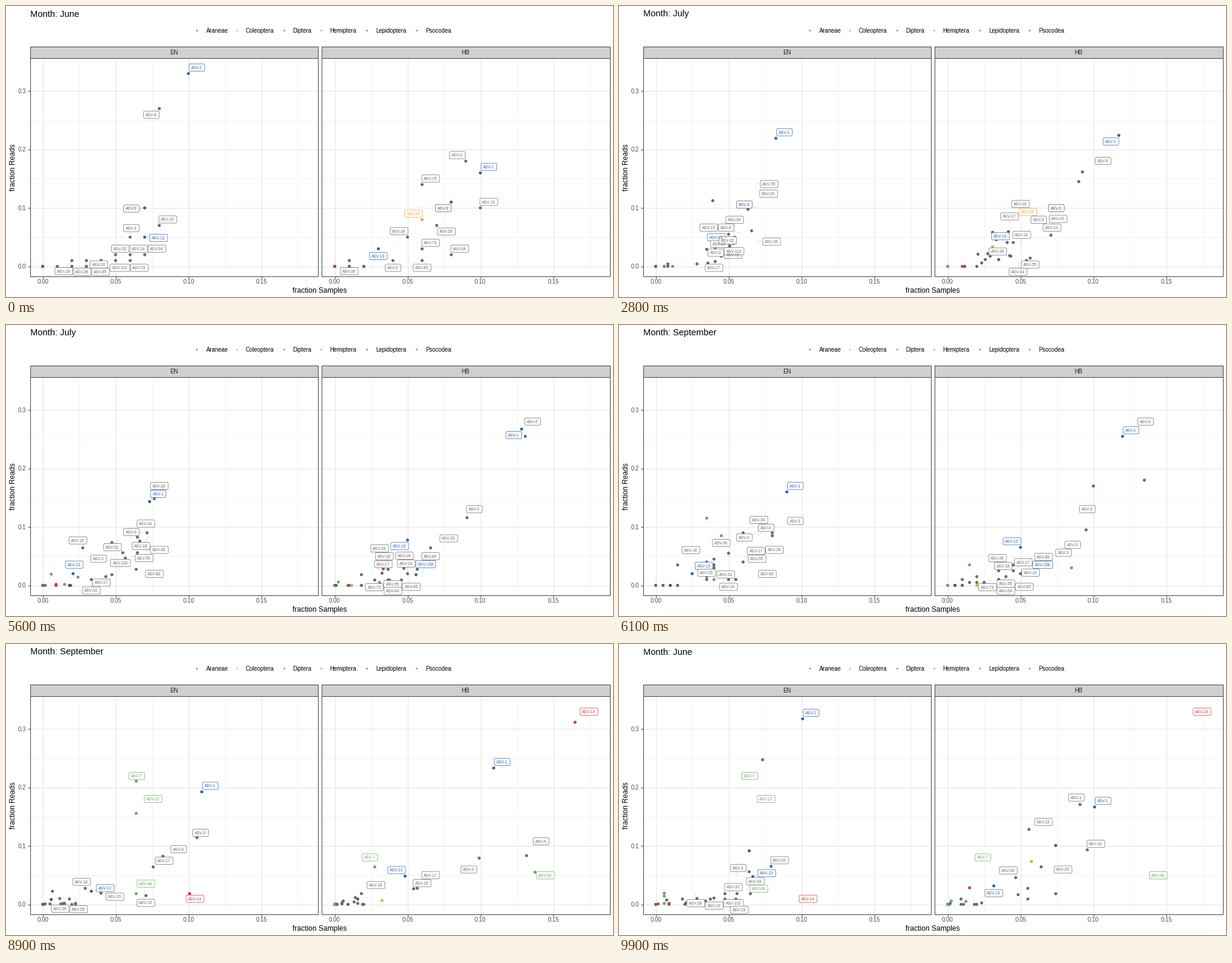
These frames come from a looping animation (1000x480 px, 10 s). A matplotlib script:

```python
from itertools import zip_longest

import matplotlib.pyplot as plt
import numpy as np
from matplotlib.animation import FuncAnimation
from matplotlib.patches import FancyBboxPatch, Rectangle

W, H, DPI = 1000, 480, 100
FRAMES, STEP = 100, 100
FONT = "Liberation Sans"
DARK = "#444444"
MONTHS = ["June", "July", "September"]
MOVES = [(21, 33), (55, 67), (88, 100)]  # first and last frame of each change
PANELS = {"EN": (39, 60), "HB": (519.6, 541)}  # left edge, x of zero
PANEL_W, TOP, STRIP, BOTTOM = 474.4, 66, 85, 445
X_UNIT, Y_UNIT, Y_ZERO = 24, 9.64, 429  # pixels per 0.01
LABEL_H = 12

# Legend order is also the drawing order.
ORDERS = [
    ("Araneae", "#2f65af", 314, 329),
    ("Coleoptera", "#efa62f", 380, 394),
    ("Diptera", "#6a6a6a", 458, 472),
    ("Hemiptera", "#6aa963", 519, 533),
    ("Lepidoptera", "#6b4778", 594, 609),
    ("Psocodea", "#cb3a3d", 676, 691),
]
SPECIAL = {1: 0, 13: 0, 158: 0, 25: 1, 7: 3, 12: 3, 48: 3, 9: 4, 14: 5}

# Where a label starts out relative to its point
SIDES = {
    "ne": (14, -10), "nw": (-14, -10), "se": (16, 10), "sw": (-13, 10),
    "n": (2, -15), "s": (0, 12), "e": (23, 1), "w": (-22, 1),
}


def row(reads, first, last, asvs, side="ne"):
    """Spread taxa with equal reads evenly along the samples axis."""
    xs = np.linspace(first, last, len(asvs)).round()
    return {asv: (x, reads, side) for asv, x in zip(asvs, xs)}


# ASV: percent of samples, percent of reads, label side
JUNE = {
    "EN": {
        1: (10, 33, "ne"), 8: (8, 27, "sw"), 9: (7, 10, "w"),
        10: (8, 7, "ne"), 3: (6, 5, "n"), 13: (7, 5, "e"),
        **row(2, 5, 7, [32, 34, 64]),
        **row(1, 2, 6, [28, 36, 20, 85, 110, 15], "s"),
        **row(0, 1, 3, [80, 18, 73, 17]),
    },
    "HB": {
        3: (9, 18, "nw"), 1: (10, 16, "ne"), 15: (6, 14, "ne"),
        10: (10, 10, "ne"), 9: (8, 11, "sw"), 25: (6, 8, "nw"),
        29: (7, 7, "se"), 28: (5, 5, "nw"), 73: (6, 3, "ne"),
        13: (3, 3, "s"), 64: (8, 2, "ne"),
        **row(1, 1, 6, [36, 6, 85], "s"),
        **row(0, 1, 2, [8, 20, 80, 17, 110]),
    },
}
JULY = {
    "EN": {
        20: (8, 16, "ne"), 1: (7, 14, "ne"), 34: (7, 9, "n"), 6: (7, 9, "w"),
        15: (3, 7, "nw"), 32: (5, 8, "sw"), 18: (7, 8, "sw"), 36: (7, 6, "e"),
        55: (6, 5, "e"), 3: (5, 5, "w"), 80: (7, 3, "se"),
        **row(2, 2, 5, [13, 110], "n"),
        **row(1, 3, 4, [10, 17], "s"),
        **row(0, 1, 2, [8, 29, 48, 25, 9, 12, 64, 85]),
    },
    "HB": {
        6: (13, 27, "ne"), 1: (13, 27, "sw"), 3: (9, 12, "ne"),
        20: (7, 7, "ne"), 13: (5, 8, "sw"), 36: (4, 3, "nw"),
        18: (5, 3, "n"), 80: (6, 3, "ne"),
        **row(2, 2, 6, [29, 17, 10, 158], "n"),
        **row(1, 3, 5, [73, 55, 64, 85], "s"),
        **row(0, 1, 2, [15, 25, 8, 14, 48, 110]),
    },
}
SEPTEMBER = {
    "EN": {
        7: (7, 23, "sw"), 12: (7, 17, "ne"), 1: (11, 18, "ne"),
        3: (11, 12, "ne"), 6: (9, 9, "ne"), 17: (8, 7, "ne"),
        48: (7, 2, "n"), 14: (11, 2, "sw"), 18: (3, 3, "nw"), 10: (7, 1, "s"),
        **row(2, 3, 4, [13, 20], "e"),
        **row(1, 1, 2, [36, 55], "s"),
        **row(0, 1, 2, [34, 85, 64, 110, 32, 73]),
    },
    "HB": {
        14: (18, 34, "sw"), 1: (11, 24, "ne"), 6: (14, 9, "ne"),
        48: (15, 6, "sw"), 3: (10, 7, "sw"), 7: (3, 7, "nw"),
        13: (5, 5, "nw"), 17: (6, 3, "ne"),
        **row(2, 2, 5, [18, 10]),
        **row(0, 1, 1, [9, 158, 15, 28, 64]),
        **row(0, 2, 3, [20, 80, 25]),
    },
}
STATES = [JUNE, JULY, SEPTEMBER]


def order_of(asv):
    return SPECIAL.get(asv, 2)


def colour_of(asv):
    return ORDERS[order_of(asv)][1]


def spot(state, panel, asv):
    x, y = state[panel].get(asv, (0, 0))[:2]
    return np.array([PANELS[panel][1] + X_UNIT * x, Y_ZERO - Y_UNIT * y])


def labelled(state, panel, order):
    names = [k for k, v in state[panel].items() if v[1] > 0 and order_of(k) == order]
    return sorted(names, key=str)


def label_tracks(a, b, panel):
    """Pair labels by rank within each order; unpaired ones wait, then vanish."""
    tracks = []
    for order in range(len(ORDERS)):
        pairs = zip_longest(labelled(a, panel, order), labelled(b, panel, order))
        for old, new in pairs:
            if old is None:
                continue
            start, side = spot(a, panel, old), SIDES[a[panel][old][2]]
            if new is None:
                tracks.append((old, old, start, start, side, side))
            else:
                tracks.append((old, new, start, spot(b, panel, new),
                               side, SIDES[b[panel][new][2]]))
    return tracks


def shove(gap, reach):
    """Shortest moves that clear boxes overlapping by less than their reach."""
    depth = reach - np.abs(gap)
    hit = (depth > 0).all(axis=-1)
    shallow = depth == depth.min(axis=-1, keepdims=True)
    return np.sign(gap) * depth * shallow * hit[..., None]


def repel(centres, sizes, points, left):
    """Push labels off each other and off the points, inside the panel."""
    n = len(centres)
    rank = np.arange(n)
    tie = 0.01 * np.sign(rank[:, None] - rank)[..., None]
    reach = (sizes[:, None] + sizes) / 2 + 1
    low = (left, STRIP) + sizes / 2 + 1
    high = (left + PANEL_W, BOTTOM) - sizes / 2 - 1
    for _ in range(40):
        push = shove(centres[:, None] - centres + tie, reach).sum(axis=1) / 2
        push += shove(centres[:, None] - points, sizes[:, None] / 2 + 2).sum(axis=1) / 2
        centres = np.clip(centres + np.clip(push, -3, 3), low, high)
    return centres


def phase(i):
    """Return the current month index and the progress to the next one."""
    for k, (first, last) in enumerate(MOVES):
        if i < last:
            return k, max(0, i - first) / (last - first)


fig = plt.figure(figsize=(W / DPI, H / DPI), dpi=DPI, facecolor="white")
ax = fig.add_axes([0, 0, 1, 1])
# Whole numbers fall on pixel centres.
ax.set_xlim(-0.5, W - 0.5)
ax.set_ylim(H - 0.5, -0.5)
ax.axis("off")


def px(size):
    return size * 72 / DPI


def write(x, y, text, size, color="black", ha="left", va="baseline", **kw):
    return ax.text(x, y, text, fontsize=px(size), color=color, ha=ha, va=va,
                   family=FONT, **kw)


def line(xs, ys, color, width, z, **kw):
    return ax.plot(xs, ys, color=color, lw=px(width), zorder=z,
                   solid_capstyle="butt", **kw)[0]


def box(x, y, w, h, z, face="none"):
    ax.add_patch(Rectangle((x, y), w, h, fc=face, ec=DARK, lw=px(1), zorder=z))


def draw_panel(name):
    left, zero = PANELS[name]
    right = left + PANEL_W
    for k in range(8):
        x, y = zero + 60 * k, Y_ZERO - 48.2 * k
        major = k % 2 == 0
        color, width = ("#e6e6e6", 1.1) if major else ("#eeeeee", 0.7)
        line([x, x], [STRIP, BOTTOM], color, width, 1)
        line([left, right], [y, y], color, width, 1)
        if major:
            line([x, x], [BOTTOM, BOTTOM + 3.5], DARK, 1, 1)
            write(x, 458, f"{k * 0.025:.2f}", 9.7, "#4d4d4d", "center")
            if name == "EN":
                line([left - 3.5, left], [y, y], DARK, 1, 1)
                write(33, y + 3.5, f"{k * 0.05:.1f}", 9.7, "#4d4d4d", "right")
    box(left, STRIP, PANEL_W, BOTTOM - STRIP, 8)
    box(left, TOP, PANEL_W, STRIP - TOP, 8, "#d0d0d0")
    write((left + right) / 2, 79.3, name, 9.6, "#1a1a1a", "center", zorder=9)


for panel in PANELS:
    draw_panel(panel)
for name, color, key_x, text_x in ORDERS:
    write(key_x, 42, "a", 5.5, color, "center", weight="bold")
    write(text_x, 43, name, 9.7)
write(516.5, 472, "fraction Samples", 12, ha="center")
write(11.5, 265.5, "fraction Reads", 12, ha="center", va="center", rotation=90)
title = write(39, 17, "", 14.6)

asvs = sorted({k for s in STATES for p in PANELS for k in s[p]}, key=order_of)
spots = {p: [np.array([spot(s, p, k) for k in asvs]) for s in STATES] for p in PANELS}
dots = {
    p: ax.scatter(*spots[p][0].T, s=13, c=[colour_of(k) for k in asvs],
                  linewidths=0, zorder=3)
    for p in PANELS
}
plans = {
    p: [label_tracks(s, STATES[(k + 1) % 3], p) for k, s in enumerate(STATES)]
    for p in PANELS
}
labels = []


def draw_label(asv, anchor, centre, size):
    color = colour_of(asv)
    (x, y), (w, h) = centre, size
    gap = np.maximum(np.abs(centre - anchor) - size / 2, 0)
    if np.hypot(*gap) > 6:
        labels.append(line([anchor[0], x], [anchor[1], y], color, 0.7, 4, alpha=0.3))
    patch = FancyBboxPatch((x - w / 2, y - h / 2), w, h,
                           boxstyle="round,pad=0,rounding_size=2",
                           fc="white", ec=color, lw=px(0.7), zorder=5)
    labels.append(ax.add_patch(patch))
    labels.append(write(x, y + 2.4, f"ASV-{asv}", 6.6, color, "center", zorder=6))


def draw_labels(panel, tracks, points, p):
    names = [t[0] if p < 0.5 else t[1] for t in tracks]
    anchors = np.array([t[2] + (t[3] - t[2]) * p for t in tracks])
    sides = np.array([t[4] if p < 0.5 else t[5] for t in tracks])
    sizes = np.array([(22 + 3.6 * len(str(k)), LABEL_H) for k in names])
    points = np.unique(points.round(), axis=0)
    centres = repel(anchors + sides, sizes, points, PANELS[panel][0])
    for args in zip(names, anchors, centres, sizes):
        draw_label(*args)


def update(i):
    k, p = phase(i)
    after = (k + 1) % 3
    title.set_text("Month: " + MONTHS[k if p < 0.5 else after])
    while labels:
        labels.pop().remove()
    for panel in PANELS:
        old, new = spots[panel][k], spots[panel][after]
        points = old + (new - old) * p
        dots[panel].set_offsets(points)
        draw_labels(panel, plans[panel][k], points, p)


anim = FuncAnimation(fig, update, frames=FRAMES, interval=STEP,
                     init_func=lambda: update(0), repeat=True, repeat_delay=0)
plt.show()
```
